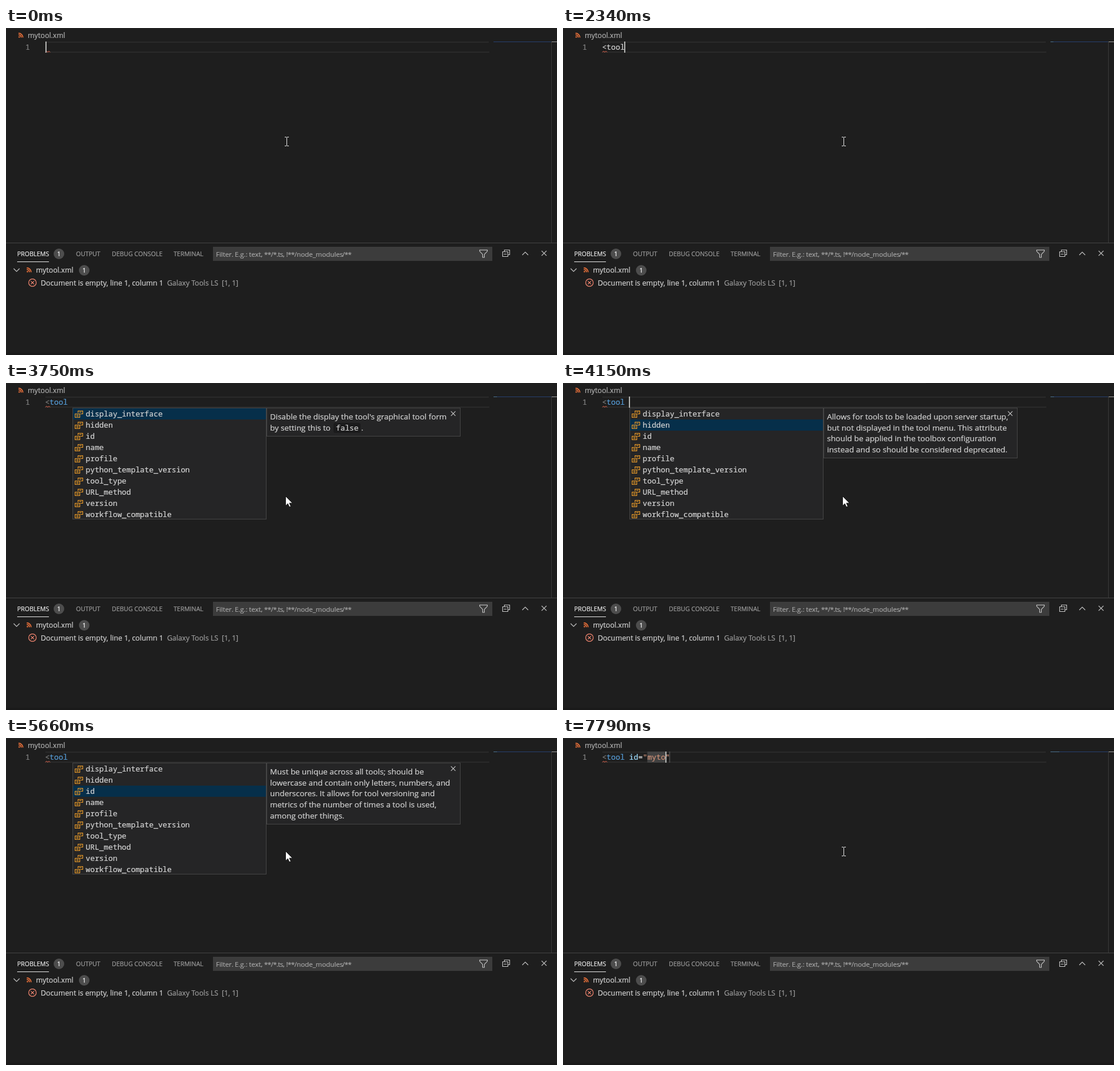
An HTML page that plays this animation: 937x556 px, repeating every 8 s.

```html
<!DOCTYPE html>
<html lang="en">
<head>
<meta charset="utf-8">
<title>Tool editor</title>
<style>
  html, body { margin: 0; width: 100%; height: 100%; overflow: hidden; background: #1e1e1e; }
  svg { display: block; }
  text {
    font: 12.2px "Open Sans", "Noto Sans", sans-serif; white-space: pre;
    color: #d2d2d2; fill: currentColor; stroke: currentColor; stroke-width: .22px;
  }
  .mono { font: 12.83px "Noto Sans Mono", "DejaVu Sans Mono", monospace; color: #d4d4d4; }
  .doc { font-size: 13.4px; }
  .tab { font-size: 10.5px; color: #9a9a9a; }
  .on { color: #e7e7e7; }
  .hint { font-size: 11.4px; color: #a6a6a6; }
  .tight { letter-spacing: -.5px; }
  .dim { color: #9c9c9c; }
  .file { color: #b0b0b0; }
  .num { color: #858585; }
  .badge { font-size: 10.5px; color: #fff; text-anchor: middle; }
  .head { font-size: 15.4px; font-weight: 700; stroke: none; }
  .punct { color: #808080; }
  .tag { color: #569cd6; }
  .attr { color: #9cdcfe; }
  .str { color: #ce9178; }
  .box { fill: #252526; stroke: #454545; }
  .sel { fill: #062f4a; }
  .line { fill: none; stroke: #c5c5c5; stroke-width: 1.1; }
  .gold { fill: none; stroke: #ee9d28; stroke-width: 1.1; }
</style>
</head>
<body>
<svg width="937" height="556" viewBox="0 0 937 556">
  <defs>
    <g id="feed" fill="none" stroke="#e8703a" stroke-width="1.7">
      <circle cx="1.5" cy="7.2" r="1.2" fill="#e8703a" stroke="none"/>
      <path d="M.3 3.6a4.4 4.4 0 0 1 4.6 4.7M.3.9a7.4 7.4 0 0 1 7.5 7.4"/>
    </g>
    <path id="close" class="line" d="M-3.8-3.8L3.8 3.8M3.8-3.8L-3.8 3.8"/>
    <path id="prop" class="gold" d="M5.5 4V.5h8v5h-4M.5 5.5h8v6h-8zM7.5 2.5h4M2.5 7.5h4M2.5 9.5h4"/>
    <path id="cls" class="gold" d="M.8 4.6L4.4.9l2.5 2.5-3.6 3.7zM5.5 5h3.5M6.5 5v6h2.5M9 4.9l2.2-2 1.9 1.9-2.2 2zM9 10.9l2.2-2 1.9 1.9-2.2 2z"/>
  </defs>

  <rect width="617" height="1" fill="#262626"/>
  <rect y="552" width="937" height="4" fill="#1a1a1a"/>

  <use href="#feed" x="21" y="8"/>
  <text class="file" x="37" y="17">mytool.xml</text>
  <path d="M67 24H821M67 41H822" stroke="#2a2a2a" stroke-width="2"/>
  <text class="mono num" x="33" y="37">1</text>
  <path d="M927.5 23V365" stroke="#3a3a3a"/>
  <rect x="829" y="23" width="98" height="1" fill="#263f6e"/>
  <rect id="mini" x="829" y="23" height="1" fill="#4a6f8c"/>
  <rect x="928" y="23" width="9" height="1" fill="#a0a0a0"/>
  <path d="M67 41.3l2-2 2 2 2-2 2 2" fill="none" stroke="#f4694f"/>
  <g id="stop">
    <rect id="slot" x="143.4" y="23" height="19" fill="#414141"/>
    <rect id="end" y="23" width="1" height="19" fill="#5c5c5c"/>
  </g>
  <text id="code" class="mono" x="66.4" y="37"></text>
  <rect id="caret" y="23" width="2" height="19" fill="#b4b5b3"/>

  <g id="tagMenu">
    <rect class="box" x="75.5" y="42.5" width="330" height="18"/>
    <rect class="sel" x="76" y="43" width="329" height="18"/>
    <use href="#cls" x="79" y="46"/>
    <text class="mono" x="97.5" y="57">tool</text>
    <rect class="box" x="405.5" y="42.5" width="329" height="227"/>
    <rect x="724" y="43" width="10" height="119" fill="#484848"/>
    <text class="doc" x="411" y="62">The outer-most tag set of tool XML files. Attributes</text>
    <text class="doc" x="411" y="81">on this tag apply to the tool as a whole.</text>
    <text class="head" x="411" y="117">Examples</text>
    <text class="doc" x="411" y="152">A normal tool:</text>
    <g id="sample"></g>
    <use href="#close" x="722" y="52"/>
  </g>

  <g id="attrMenu">
    <rect class="box" x="113.5" y="42.5" width="329" height="189"/>
    <rect id="pick" class="sel" x="114" width="328" height="19"/>
    <g id="items"></g>
    <rect id="docBox" class="box" x="443.5" y="42.5" width="329"/>
    <g id="docs"></g>
    <use href="#close" x="760.5" y="52"/>
  </g>

  <path id="beam" d="M474 185.5h3M478 185.5h3M477.5 186V200M474 200.5h3M478 200.5h3" stroke="#e8e8e8"/>
  <path id="arrow" d="M475.5 192.5v16.3l3.8-3.6 2.5 5.6 2.6-1.1-2.5-5.5h5.2z" fill="#fff" stroke="#111" stroke-width=".9"/>

  <path d="M0 365.5H937" stroke="#444"/>
  <text class="tab on" x="19" y="388">PROBLEMS</text>
  <path d="M19 397.5H73" stroke="#e7e7e7"/>
  <circle cx="90" cy="384" r="9" fill="#4d4d4d"/>
  <text class="badge" x="90" y="388">1</text>
  <text class="tab" x="119" y="388">OUTPUT</text>
  <text class="tab" x="180" y="388">DEBUG CONSOLE</text>
  <text class="tab" x="285" y="388">TERMINAL</text>
  <rect x="352" y="372" width="475" height="24" fill="#3c3c3c"/>
  <text class="hint" y="389"><tspan x="357">Filter.</tspan><tspan x="389">E.g.:</tspan><tspan x="413.3">text,</tspan><tspan class="tight" x="439">**/*.ts,</tspan><tspan class="tight" x="476.5">!**/</tspan><tspan x="494.5">node_modules</tspan><tspan class="tight" x="572">/**</tspan></text>
  <path class="line" d="M805.5 377.5h13v2l-5 5.5v5h-3v-5l-5-5.5z"/>
  <path class="line" d="M847.5 380.5v-3h9v8h-3M844.5 380.5h9v8h-9zM846.5 384.5h5"/>
  <path class="line" d="M878 386l5-5 5 5"/>
  <use href="#close" transform="translate(915 383) scale(1.1)"/>

  <path class="line" d="M13 409l5 5 5-5"/>
  <use href="#feed" x="35" y="407"/>
  <text x="51" y="416">mytool.xml</text>
  <circle cx="133" cy="412" r="9" fill="#4d4d4d"/>
  <text class="badge" x="133" y="416">1</text>
  <g fill="none" stroke="#f48771" stroke-width="1.2">
    <circle cx="45" cy="433" r="6.4"/>
    <path d="M42.3 430.3l5.4 5.4M47.7 430.3l-5.4 5.4"/>
  </g>
  <text x="59" y="438" style="font-size:12.35px">Document is empty, line 1, column 1</text>
  <text class="dim" x="274" y="438">Galaxy Tools LS</text>
  <text class="dim" x="367" y="438">[1, 1]</text>
</svg>

<script>
const LOOP = 8000, LEFT = 66.4, ADVANCE = 7.7, ROW = 19, DOC_LINE = 56 / 3;
const $ = id => document.getElementById(id);
const show = (id, on) => { $(id).style.display = on ? '' : 'none'; };
const put = (id, attrs) => { for (const k in attrs) $(id).setAttribute(k, attrs[k]); };
const span = (cls, s) => `<tspan class="${cls}">${s.replace('<', '&lt;')}</tspan>`;
const text = (cls, x, y, s) => `<text class="${cls}" x="${x}" y="${y}">${s}</text>`;

// [time, text before the caret]
const typed = [
  [0, ''], [950, '<'], [2340, '<tool'], [3200, '<tool '], [6070, '<tool id="'],
  [7210, '<tool id="m'], [7360, '<tool id="my'], [7670, '<tool id="myt'], [7790, '<tool id="myto']
];
const caretOff = [[150, 670], [1380, 1780], [2920, 3200], [3750, 4150], [4670, 5230], [5660, 6070], [6500, 7060]];
const picks = [[0, 0], [4150, 1], [4550, 2]];

const names = ['display_interface', 'hidden', 'id', 'name', 'profile', 'python_template_version',
  'tool_type', 'URL_method', 'version', 'workflow_compatible'];
const docs = [
  ["Disable the display the tool's graphical tool form", 'by setting this to'],
  ['Allows for tools to be loaded upon server startup,', 'but not displayed in the tool menu. This attribute',
    'should be applied in the toolbox configuration', 'instead and so should be considered deprecated.'],
  ['Must be unique across all tools; should be', 'lowercase and contain only letters, numbers, and',
    'underscores. It allows for tool versioning and', 'metrics of the number of times a tool is used,',
    'among other things.']
];

const pair = (key, val) => span('attr', key) + '=' + span('str', `"${val}"`);
$('sample').innerHTML =
  text('mono', 411, 184, span('punct', '<') + span('tag', 'tool')) +
  [['id', 'seqtk_seq'], ['name', 'Convert FASTQ to FASTA'], ['version', '1.0.0'], ['profile', '16.04']]
    .map(([k, v], i) => text('mono', 457, 184 + ROW * i, pair(k, v))).join('') +
  text('mono punct', 411, 260, '&gt;');

$('items').innerHTML = names.map((n, i) =>
  `<use href="#prop" x="117" y="${47 + ROW * i}"/>` + text('mono', 135.5, 57 + ROW * i, n)).join('');

$('docs').innerHTML = docs.map((lines, i) => `<g id="doc${i}">` +
  lines.map((s, j) => text('doc', 449, Math.round(62 + DOC_LINE * j), s)).join('') +
  (i ? '' : '<rect x="557" y="68" width="46" height="17" rx="3" fill="#1b1b1c"/>' +
    text('mono', 561, 81, 'false') + text('doc', 604, 81, '.')) + '</g>').join('');

const latest = (steps, t) => steps.filter(s => s[0] <= t).pop()[1];
const within = (t, a, b) => t >= a && t < b;

function paint(code, coloured) {
  if (!coloured) return span('', code);
  const [head, value] = code.split(' id="');
  return span('punct', '<') + span('tag', head.slice(1)) +
    (value === undefined ? '' : ' ' + pair('id', value));
}

let shown = '';
function draw(t) {
  const code = latest(typed, t), n = code.length, snippet = t >= 6070;
  const coloured = t >= 2460, key = code + coloured;
  if (key !== shown) {
    $('code').innerHTML = paint(code, coloured);
    shown = key;
  }
  put('caret', { x: Math.max(67, Math.floor(LEFT + ADVANCE * n)) });
  show('caret', !caretOff.some(([a, b]) => within(t, a, b)));
  put('mini', { width: n + snippet });

  show('stop', snippet);
  put('slot', { width: Math.max(2, ADVANCE * (n - 10)) });
  put('end', { x: Math.floor(LEFT + ADVANCE * (n + 1)) });

  const tags = within(t, 950, 2340), attrs = within(t, 3320, 6070), pick = latest(picks, t);
  show('tagMenu', tags);
  show('attrMenu', attrs);
  show('arrow', tags || attrs);
  show('beam', !tags && !attrs);
  put('pick', { y: 43 + ROW * pick });
  put('docBox', { height: Math.round(10.5 + DOC_LINE * docs[pick].length) });
  docs.forEach((_, i) => show('doc' + i, i === pick));
}

const start = performance.now();
function tick() {
  draw((performance.now() - start) % LOOP);
  requestAnimationFrame(tick);
}
tick();
</script>
</body>
</html>
```
